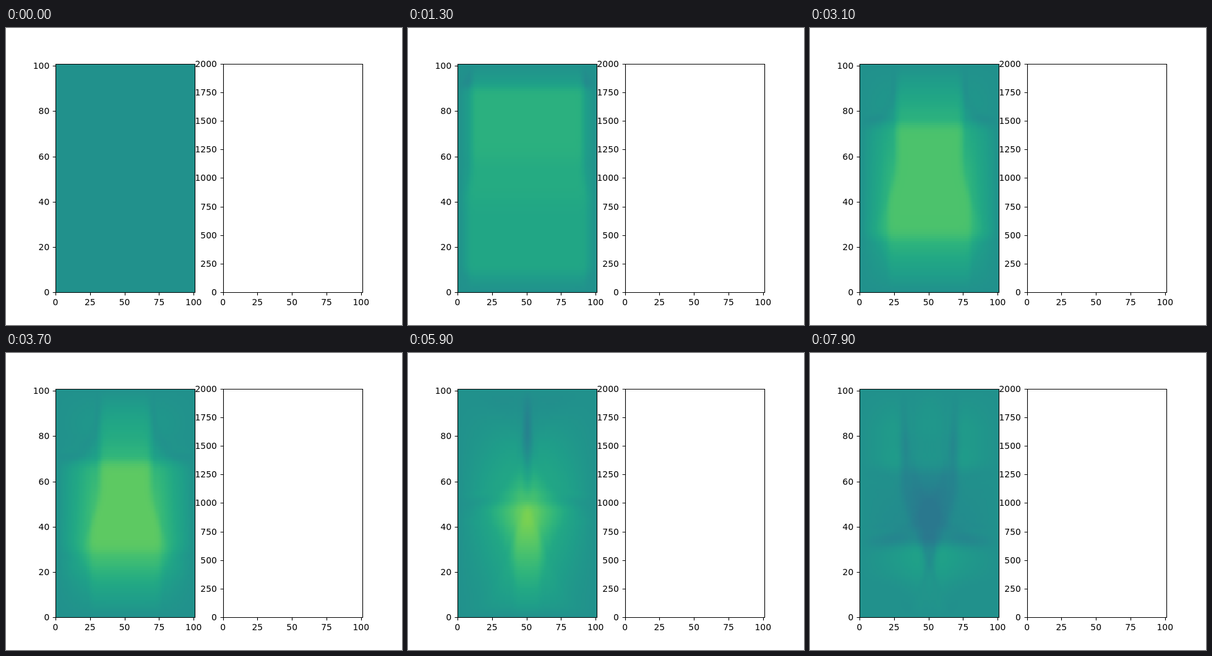
An HTML page with a canvas for the animation above (8 s loop, 640 px wide and 480 px high).

```html
<!DOCTYPE html>
<html lang="en">
<head>
<meta charset="utf-8">
<title>Membrane simulation</title>
<style>
  html, body { margin: 0; width: 100%; height: 100%; overflow: hidden; background: #fff; }
  canvas, svg { position: absolute; left: 0; top: 0; display: block; }
  text { font: 13.89px "DejaVu Sans", sans-serif; }
</style>
</head>
<body>
<canvas id="view" width="640" height="480"></canvas>
<svg id="axes" width="640" height="480" viewBox="0 0 640 480"></svg>
<script>
const LOOP = 8000, FIRST_HOLD = 500, STEP = 200, FRAMES = 39;
const TOP = 57.6, BOTTOM = 427.2, WIDTH = 225.4545;
const SIZE = 101, DT = 0.25;

// Axes
const snap = v => Math.floor(v + 0.5) + 0.5;

function drawAxes(left, yMax, yStep) {
  const right = left + WIDTH;
  let path = `M${snap(left)} ${snap(TOP)}H${snap(right)}V${snap(BOTTOM)}H${snap(left)}Z`;
  let labels = '';
  for (let v = 0; v <= 100; v += 25) {
    const x = left + v / SIZE * WIDTH;
    path += `M${snap(x)} ${snap(BOTTOM)}v4.86`;
    labels += `<text x="${x}" y="448" text-anchor="middle">${v}</text>`;
  }
  for (let v = 0; v <= yMax; v += yStep) {
    const y = BOTTOM - v / yMax * (BOTTOM - TOP);
    path += `M${snap(left)} ${snap(y)}h-4.86`;
    labels += `<text x="${left - 9.72}" y="${Math.round(y + 5)}" text-anchor="end">${v}</text>`;
  }
  return `<path d="${path}" fill="none" stroke="#000" stroke-width="1.11"/>${labels}`;
}
document.getElementById('axes').innerHTML =
  drawAxes(80, SIZE, 20) + drawAxes(350.5455, 2000, 250);

// Colour map, one stop every 0.05 starting at 0.4
const STOPS = [[42,120,142], [37,132,142], [33,145,140], [31,158,137], [34,168,132],
  [47,180,124], [68,191,112], [94,201,98], [122,209,81], [155,217,60], [189,223,38]];

function colour(value) {
  const p = Math.min(Math.max((value - 0.4) / 0.05, 0), STOPS.length - 1.001);
  const i = Math.floor(p);
  return STOPS[i].map((c, k) => c + (STOPS[i + 1][k] - c) * (p - i));
}

// Two-layer membrane with fixed edges: displacement and velocity at the start
const mix = (a, b, t) => a + (b - a) * t;
const upperShare = y => 1 / (1 + Math.exp(-(y - 49) / 2));
const edge = i => Math.tanh(i / 2) * Math.tanh((SIZE - 1 - i) / 2);

let now = new Float64Array(SIZE * SIZE);
let before = new Float64Array(SIZE * SIZE);
for (let y = 0; y < SIZE; y++) {
  for (let x = 0; x < SIZE; x++) {
    const i = y * SIZE + x, shape = edge(x) * edge(y);
    now[i] = mix(0.03, 0.073, upperShare(y)) * shape;
    before[i] = now[i] - 0.0115 * DT * shape;
  }
}

function advance() {
  const next = new Float64Array(SIZE * SIZE);
  for (let y = 1; y < SIZE - 1; y++) {
    const s = upperShare(y);
    const kx = (mix(1.46, 1.86, s) * DT) ** 2;
    const ky = (mix(1.71, 1.86, s) * DT) ** 2;
    for (let x = 1; x < SIZE - 1; x++) {
      const i = y * SIZE + x, u = now[i];
      next[i] = 2 * u - before[i]
        + kx * (now[i - 1] + now[i + 1] - 2 * u)
        + ky * (now[i - SIZE] + now[i + SIZE] - 2 * u);
    }
  }
  before = now;
  now = next;
}

function paint(field) {
  const canvas = document.createElement('canvas');
  canvas.width = canvas.height = SIZE;
  const ctx = canvas.getContext('2d');
  const image = ctx.createImageData(SIZE, SIZE);
  for (let y = 0; y < SIZE; y++) {
    for (let x = 0; x < SIZE; x++) {
      const rgb = colour(0.5 + field[y * SIZE + x]);
      image.data.set([...rgb, 255], 4 * ((SIZE - 1 - y) * SIZE + x));
    }
  }
  ctx.putImageData(image, 0, 0);
  return canvas;
}

const frames = [paint(new Float64Array(SIZE * SIZE))];
advance();
while (frames.length < FRAMES) {
  for (let k = 0; k < 1 / DT; k++) advance();
  frames.push(paint(now));
}

// Playback
const view = document.getElementById('view').getContext('2d');
view.imageSmoothingEnabled = false;
const start = performance.now();

function render() {
  const t = (performance.now() - start) % LOOP;
  const n = t < FIRST_HOLD ? 0 : 1 + Math.floor((t - FIRST_HOLD) / STEP);
  view.clearRect(0, 0, 640, 480);
  view.drawImage(frames[Math.min(n, FRAMES - 1)], 80, 58, 226, 370);
  requestAnimationFrame(render);
}
render();
</script>
</body>
</html>
```
